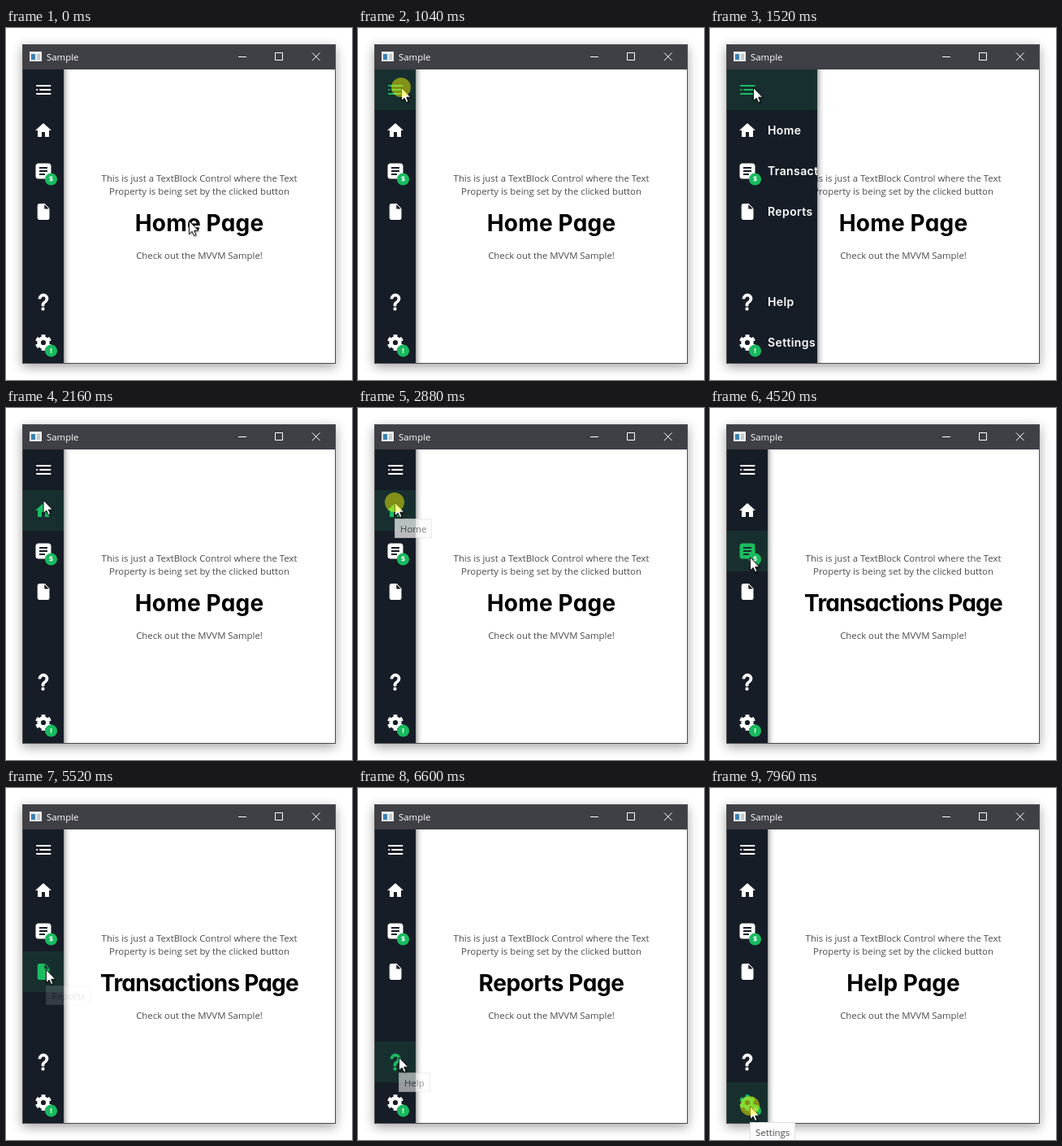
Recreate the animation shown at these times as an HTML page. Size 426 px wide and 433 px high, loop 8000 ms.

```html
<!DOCTYPE html>
<html lang="en">
<head>
<meta charset="utf-8">
<title>Sample</title>
<style>
  html, body { margin: 0; width: 100%; height: 100%; overflow: hidden; background: #fff; }
  svg { display: block; width: 426px; height: 433px; }
  text { font: 11.4px "Open Sans", sans-serif; fill: #4c4c4c; }
  .mid { text-anchor: middle; }
  #heading { font: 700 28px Inter, sans-serif; font-feature-settings: "cv11"; fill: #000; }
  .label { font: 600 14px Inter, sans-serif; letter-spacing: .4px; fill: #fff; }
  .badge { font: 700 9px "Open Sans", sans-serif; fill: #fff; }
  .icon { color: #fff; fill: currentColor; fill-rule: evenodd; }
  .line { fill: none; stroke: currentColor; }
  .hover .icon { color: #1bbc60; }
  .row { fill: none; }
  .hover .row { fill: #17302f; }
  #window { filter: drop-shadow(0 4px 7px rgba(0, 0, 0, .36)); }
  #cursor { filter: drop-shadow(1px 1px 1px rgba(0, 0, 0, .4)); }
</style>
</head>
<body>
<svg viewBox="0 0 426 433">
  <defs>
    <linearGradient id="fade">
      <stop offset="0" stop-opacity=".36"/>
      <stop offset=".4" stop-opacity=".13"/>
      <stop offset="1" stop-opacity="0"/>
    </linearGradient>
    <clipPath id="clip"><rect id="clipRect" x="21" y="51" height="361"/></clipPath>
  </defs>

  <rect id="window" x="20" y="20" width="386" height="393" fill="#4a4a50"/>
  <rect x="21" y="21" width="384" height="30" fill="#3f3f46"/>
  <rect x="21" y="51" width="384" height="361" fill="#fff"/>
  <path d="M29 29h15v12h-15z" fill="#eceff1"/>
  <path d="M31 32h5v7h-5z" fill="#3a83b0"/>
  <path d="M38 32h4v7h-4z" fill="#c3cbd0"/>
  <text x="50" y="40" style="fill:#fff">Sample</text>
  <path d="M286 35.5h10M331.5 30.5h9v9h-9zM377 30.5l9.5 9.5m0 -9.5l-9.5 9.5" fill="none" stroke="#fff"/>

  <g class="mid">
    <text x="238" y="189">This is just a TextBlock Control where the Text</text>
    <text x="238" y="205">Property is being set by the clicked button</text>
    <text id="heading" x="238" y="250"></text>
    <text x="238" y="284">Check out the MVVM Sample!</text>
  </g>

  <rect id="shade" y="51" width="8" height="361" fill="url(#fade)"/>
  <g id="panel" clip-path="url(#clip)">
    <rect x="21" y="51" width="200" height="361" fill="#161d27"/>
  </g>

  <g id="tip">
    <rect x=".5" y=".5" height="23" fill="#fcfcfc" stroke="#e0e0e0"/>
    <text x="7" y="17"></text>
  </g>
  <path id="cursor" d="M.5 .5V16.6L4.2 13.2L6.6 18.6L9 17.6L6.7 12.2H11.8Z" fill="#fff" stroke="#000" stroke-width=".9"/>
  <circle id="press" r="12" fill="#ff0" fill-opacity=".47"/>
</svg>

<script>
const LOOP = 8000;
const $ = id => document.getElementById(id);
const set = (el, attrs) => Object.entries(attrs).forEach(([k, v]) => el.setAttribute(k, v));
const clamp = v => Math.min(1, Math.max(0, v));
const ramp = (t, from, to) => clamp((t - from) / (to - from));
const smooth = p => p * p * (3 - 2 * p);

const items = [
  { y: 51, name: '', icon: '<path class="line" stroke-width="2" stroke-linecap="round" d="M4 7H20.5M4 12H4.3M8 12H20.5M4 17H20.5"/>' },
  { y: 101, name: 'Home', icon: '<path d="M10 20V14H14V20H19V12H22L12 3L2 12H5V20Z"/>' },
  { y: 151, name: 'Transactions', badge: '$', icon: '<path d="M14 17H7V15H14ZM17 13H7V11H17ZM17 9H7V7H17ZM18 2.5H6A3.5 3.5 0 0 0 2.5 6V18A3.5 3.5 0 0 0 6 21.5H18A3.5 3.5 0 0 0 21.5 18V6A3.5 3.5 0 0 0 18 2.5Z"/>' },
  { y: 201, name: 'Reports', icon: '<path d="M13.3 8.5V3L18.8 8.5ZM7 2A2.5 2.5 0 0 0 4.7 4.5V19.5A2.5 2.5 0 0 0 7 22H17A2.5 2.5 0 0 0 19.5 19.5V8L13.8 2Z"/>' },
  { y: 312, name: 'Help', icon: '<path stroke="currentColor" stroke-width=".8" d="M10 19H13V22H10ZM12 2C17.4 2.2 19.7 7.6 16.5 11.7C15.7 12.7 14.3 13.3 13.7 14.2C13 15 13 16 13 17H10C10 15.3 10 13.9 10.7 12.9C11.3 11.9 12.7 11.3 13.5 10.7C15.9 8.4 15.3 5.3 12 5A3 3 0 0 0 9 8H6A6 6 0 0 1 12 2Z"/>' },
  { y: 362, name: 'Settings', badge: '!', icon: '<circle class="line" cx="12" cy="12" r="5.4" stroke-width="4.6"/><circle class="line" cx="12" cy="12" r="8.5" stroke-width="3" pathLength="60" stroke-dasharray="5.4 4.6" stroke-dashoffset="-2.3"/>' }
];

for (const item of items) {
  const g = document.createElementNS('http://www.w3.org/2000/svg', 'g');
  g.setAttribute('transform', `translate(21 ${item.y})`);
  g.innerHTML = `<rect class="row" width="200" height="50"/>
    <g class="icon" transform="translate(13 13)">${item.icon}</g>
    <text class="label" x="50" y="30">${item.name}</text>` +
    (item.badge ? `<circle cx="34.5" cy="35" r="7.6" fill="#17ba5e"/>
    <text class="badge mid" x="34.5" y="38.3">${item.badge}</text>` : '');
  $('panel').append(g);
  item.el = g;
}

// Mouse strokes: start, end, target x, target y
const start = [225, 237];
const moves = [
  [80, 800, 53, 73], [1760, 2240, 45, 116], [2960, 3440, 49, 175],
  [4400, 4860, 49, 223], [5680, 6290, 50, 331], [7160, 7480, 49, 391]
];
const presses = [1000, 1300, 2840, 4100, 5400, 6960, 7940];
// Tooltips: name, shown at, dismissed at, x, y
const tips = [
  ['Home', 2520, 2840, 45, 136], ['Transactions', 3780, 4100, 49, 195],
  ['Reports', 5100, 5400, 49, 243], ['Help', 6500, 6960, 50, 350], ['Settings', 7700, 8100, 49, 411]
];
// Pages: from, title, tracking
const pages = [[0, 'Home', .2], [4260, 'Transactions', -.8], [5560, 'Reports', -.4], [7120, 'Help', 0]];

function mouseAt(t) {
  let [x, y] = start;
  for (const [from, to, tx, ty] of moves) {
    const p = smooth(ramp(t, from, to));
    x += (tx - x) * p;
    y += (ty - y) * p;
  }
  return [x, y];
}

function draw(t) {
  const [x, y] = mouseAt(t);
  set($('cursor'), { transform: `translate(${x} ${y})` });
  set($('press'), { cx: x, cy: y, opacity: presses.some(p => t >= p && t < p + 100) ? 1 : 0 });

  const width = Math.round(50 + 150 * (ramp(t, 1080, 1320) - ramp(t, 1402, 1602)));
  set($('clipRect'), { width });
  set($('shade'), { x: 21 + width });
  for (const item of items)
    item.el.classList.toggle('hover', x < 21 + width && y >= item.y && y < item.y + 50);

  const [, title, tracking] = pages.findLast(p => t >= p[0]);
  $('heading').textContent = title + ' Page';
  $('heading').style.letterSpacing = tracking + 'px';

  const tip = tips.find(([, from, to]) => t >= from && t < to + 140);
  $('tip').style.display = tip ? '' : 'none';
  if (tip) {
    const [name, from, to, tx, ty] = tip;
    const [box, text] = $('tip').children;
    text.textContent = name;
    set(box, { width: Math.round(text.getComputedTextLength()) + 13 });
    set($('tip'), {
      transform: `translate(${tx} ${ty})`,
      opacity: ramp(t, from, from + 180) - ramp(t, to, to + 140)
    });
  }
}

const begin = performance.now();
function tick() {
  draw((performance.now() - begin) % LOOP);
  requestAnimationFrame(tick);
}
tick();
</script>
</body>
</html>
```
